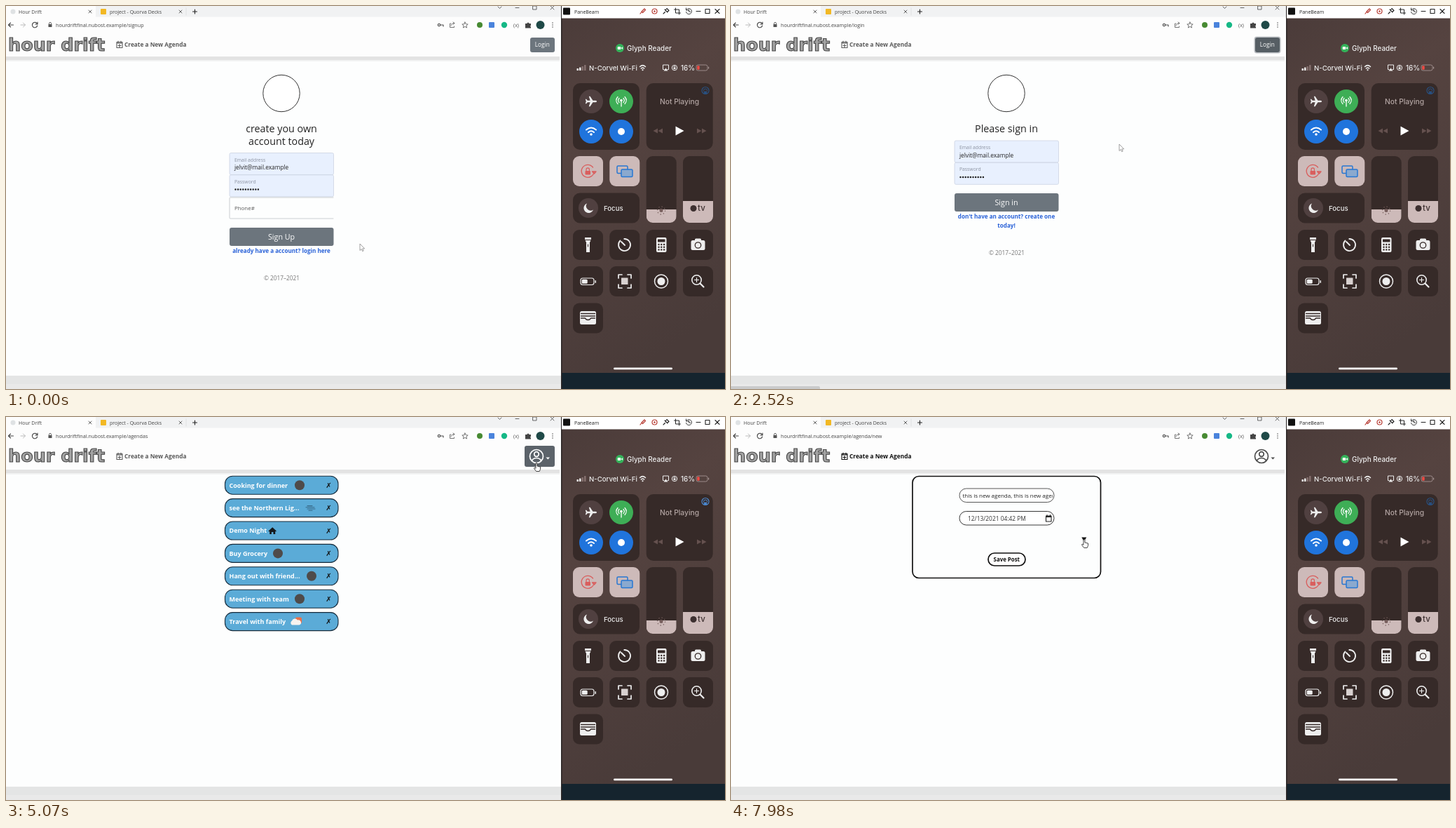
An HTML page that plays this animation: 1026 by 546 pixels, repeating every 8000 ms.

```html
<!DOCTYPE html>
<html lang="en">
<head>
<meta charset="utf-8">
<title>Agenda demo</title>
<style>
html, body { margin: 0; width: 100%; height: 100%; overflow: hidden; background: #fdfefe; }
svg { display: block; width: 1026px; height: 546px; font-family: "Open Sans", "Noto Sans", sans-serif; }
.b { font-weight: 700; }
.m { text-anchor: middle; }
.i { font-family: Inter, Roboto, sans-serif; font-weight: 500; }
.s { font-family: "DejaVu Sans", sans-serif; }
.l { fill: none; stroke-linecap: round; stroke-linejoin: round; }
</style>
</head>
<body>
<svg id="stage" viewBox="0 0 1026 546"></svg>
<script>
const LOOP = 8000, STEP = 132;
const ink = '#222', grey = '#6c757d', link = '#2a62d8', tile = '#362a28', knob = '#504040', pale = '#cdbab9', lit = '#eee';

// Markup helpers: rectangle, circle, text, stroked line, filled path, group
const R = (x, y, w, h, r, fill, more = '') => `<rect x="${x}" y="${y}" width="${w}" height="${h}" rx="${r}" fill="${fill}" ${more}/>`;
const C = (x, y, r, fill, more = '') => `<circle cx="${x}" cy="${y}" r="${r}" fill="${fill}" ${more}/>`;
const T = (x, y, size, text, fill = ink, cls = '', more = '') => `<text x="${x}" y="${y}" font-size="${size}" fill="${fill}" class="${cls}" ${more}>${text}</text>`;
const L = (d, color = ink, w = 1, more = '') => `<path class="l" d="${d}" stroke="${color}" stroke-width="${w}" ${more}/>`;
const F = (d, fill, more = '') => `<path d="${d}" fill="${fill}" ${more}/>`;
const G = (id, ...parts) => `<g id="${id}">${parts.join('')}</g>`;
const line = (color, w) => `stroke="${color}" stroke-width="${w}"`;

function browser() {
  const dim = '#555';
  return [
    R(0, 0, 792, 546, 0, '#fdfefe'), R(0, 0, 792, 72, 0, '#fdfdfd'), R(128, 0, 664, 15.500, 0, '#f1f2f3'),
    C(10, 8, 3.500, '#dfe2e4'), T(18, 10.500, 7, 'Hour Drift', '#444'),
    L('M118 6l4 4m0-4l-4 4M247 6l4 4m0-4l-4 4', dim, .9),
    R(135, 4, 8, 8, 1, '#f2b824'), T(148, 10.500, 7, 'project - Quorva Decks', '#444'),
    L('M257 3v10', '#ddd', .8), L('M266.500 8h6m-3-3v6', ink, 1.100),
    L('M702 1l2.500 2.500l2.500-2.500M727 2.500h5', dim, .9),
    L('M752 0h5v5h-5zM777 0l5 5m0-5l-5 5', dim, .9),
    L('M10.500 27h-7m3-3l-3 3l3 3', '#444', 1.100), L('M21 27h6.500m-3-3l3 3l-3 3', '#bbb', 1),
    L('M44.500 25.500a3.700 3.700 0 1 0 .200 2.500M45 23v3h-3', '#444', 1.100),
    R(60.500, 26, 5, 4, .6, dim), L('M61.500 26v-1.200a1.500 1.500 0 0 1 3 0V26', dim, .9),
    C(618, 27, 1.700, 'none', line(dim, 1.200)), L('M620 27h4v2', dim, 1.200),
    L('M635 25h-1.500v5.500h6V29M635 28q.5-3.500 5-3.500m-2-1.500l2 1.500l-2 1.800', dim, .8),
    L('M655 23l1.200 2.700l3 .3l-2.300 2l.7 3l-2.600-1.600l-2.600 1.600l.7-3l-2.300-2l3-.3z', dim, .8),
    C(676, 27, 4, '#478a32'), R(689, 23, 8, 8, 1, '#4a83dc'), C(711, 27, 4.200, '#16b886'),
    T(728, 29.500, 7, '(x)', dim, 'm'),
    F('M741 25h2.500a1.500 1.500 0 0 1 3 0h2.500v2.500a1.500 1.500 0 0 0 0 2.500v1.500h-8z', '#444'),
    C(762.500, 27, 6, '#1f4947'),
    C(780, 24, .8, dim), C(780, 27, .8, dim), C(780, 30, .8, dim),
    R(0, 527, 792, 19, 0, '#e4e5e5'), R(0, 539, 792, 7, 0, '#e9e9e9'),
    G('band', R(0, 72, 790, 5, 0, '#e3e3e3'), R(0, 77, 790, 2, 0, '#f2f3f3')),
    T(3, 63.500, 25.500, 'hour drift', '#a3a3a3', 's b', line('#444', 1.100)),
    G('nav', L('M158 51.500h8v8h-8zM158 53h8M160 50v2m4-2v2M162 54.500v4m-2-2h4', 'currentColor', 1.100),
      T(169, 58.200, 8.300, 'Create a New Agenda', 'currentColor', 'b')),
    T(71, 29.600, 7.200, '', '#444', '', 'id="url"')
  ].join('');
}

function field(y, label, value) {
  return R(319, y, 148.500, 31, 2, '#e8f0fe', line('#ccd4e2', .8)) + T(326, y + 12, 6.800, label, '#8b92a0') + value;
}

// Sign-up and login share this form; the button sits at a different height.
function form(first, button, caption) {
  return field(first, 'Email address', T(326, first + 23.500, 8.300, 'jelvit@mail.example')) +
    field(first + 31.300, 'Password', L(`M327.500 ${first + 52}h33`, ink, 2.500, 'stroke-dasharray="0 3.600"')) +
    R(319, button, 148.500, 26, 3, grey) + T(393, button + 17.300, 10.700, caption, '#fff', 'm') +
    C(393, 124.500, 26.200, '#fff', line('#333', 1));
}

function loginButton() {
  return G('ring', R(746.500, 43.500, 38, 24, 4, '#b9bdc1')) + R(748, 45, 35, 21, 3, grey, 'id="loginBox"') +
    T(765.300, 58.200, 8.300, 'Login', '#fff', 'm');
}

function signup() {
  return T(393, 179.500, 14.300, 'create you own', ink, 'm') + T(393, 198, 14.300, 'account today', ink, 'm') +
    form(209.500, 316, 'Sign Up') +
    L('M467 273H320q-1 0-1 1v28q0 1 1 1h147', '#c6c9cc', .9) + T(326, 291, 7.900, 'Phone#', '#555') +
    T(393, 352, 8.100, 'already have a account? login here', link, 'b m') +
    T(393.500, 391, 8.300, '© 2017–2021', '#777', 'm');
}

function login() {
  return T(393, 179.500, 14.300, 'Please sign in', ink, 'm') + form(192, 267, 'Sign in') +
    T(393, 303, 8.100, "don't have an account? create one", link, 'b m') +
    T(393, 315.500, 8.100, 'today!', link, 'b m') + T(393.500, 355, 8.300, '© 2017–2021', '#777', 'm');
}

function agendas() {
  const dot = x => y => C(x, y, 7, '#4f4b4a');
  const mist = y => L(`M430 ${y - 3}h7m-9 2.200h12m-10 2.200h11m-9 2.200h5`, '#386987', 1.100);
  const house = y => F(`M374.500 ${y + .5}l5.700-5.200l5.700 5.200l-.9 1l-.8-.7v4.200h-2.700v-3h-2.600v3h-2.700v-4.200l-.8.700z`, '#15191c');
  const cloud = y => R(413, y - 6, 9, 9, 2, '#ea7049') +
    F(`M408 ${y + 5}a3.500 3.500 0 0 1 0-6a4.500 4.500 0 0 1 8-1a3.500 3.500 0 0 1 2.500 7z`, '#f7f3ef');
  return [
    ['Cooking for dinner', dot(419)], ['see the Northern Lig...', mist], ['Demo Night', house],
    ['Buy Grocery', dot(388)], ['Hang out with friend...', dot(436)], ['Meeting with team', dot(419)],
    ['Travel with family', cloud]
  ].map(([text, icon], i) => {
    const y = 97.200 + 32.400 * i;
    return R(312.500, y - 13, 161.500, 26, 11, '#5babd7', line('#172b3b', 1.100)) +
      T(318.500, y + 3.400, 9, text, '#fff', 'b') + icon(y) + T(460.500, y + 3.600, 10, '✗', '#111', 's m');
  }).join('');
}

function newAgenda() {
  const pill = (y, more) => R(326, y, 135, 19.500, 9.700, '#fff', more);
  return R(259, 84.500, 268.500, 145, 9, 'none', line('#111', 1.700)) + pill(102, line('#444', .9)) +
    `<clipPath id="clip">${R(328, 102, 131, 20, 0, '#fff')}</clipPath>` +
    G('title', T(330.500, 115, 8, 'this is new agenda, this is new agenda', ink, '', 'clip-path="url(#clip)"')) +
    pill(134.500, 'id="dateBox" stroke="#222"') +
    G('blank', R(341.500, 139, 15, 12, 0, '#1971d9'), T(342, 147.800, 8, '<tspan fill="#fff">mm</tspan>/dd/yyyy', '#666'),
      T(393, 147.800, 8, '<tspan fill="#bbb">--</tspan>:<tspan fill="#bbb">-- --</tspan>', '#777')) +
    G('date', T(338, 147.800, 8.400, '12/13/2021 04:42 PM', '#333')) +
    L('M449.500 141h7.500v8h-7.500zM451 139.500v1m4.500-1v1', ink, 1.100) + R(449.500, 141, 7.500, 2, 0, ink) +
    F('M500.300 171.500h7l-3.500 6z', '#111') +
    R(367, 194, 53, 18, 9, '#fff', line('#111', 1.700)) + T(393.300, 206, 7.900, 'Save Post', '#111', 'b m') +
    G('popup', R(326.500, 156, 212, 151.500, 1, 'none', line('#ddd', 1.500)),
      R(325.500, 154.500, 212, 151.500, 1, 'none', 'id="sheet" stroke="#c9c9c9" stroke-width=".8"'));
}

function profile() {
  return G('hover', R(740, 41, 43, 30, 3, '#5c636a')) +
    G('user', C(757, 56, 9.500, 'none', line('currentColor', 1.700)),
      C(757, 53, 3.300, 'none', line('currentColor', 1.700)), L('M750.500 62q2-3.500 6.500-3.500t6.500 3.500', 'currentColor', 1.700),
      F('M770.500 57.500h5.500l-2.700 3z', 'currentColor'));
}

function phoneTop() {
  return [
    R(792, 0, 234, 546, 0, 'url(#wall)'), R(792, 523, 234, 23, 0, '#15242e'), R(792, 0, 1.500, 546, 0, '#2a2525'),
    R(793, 0, 233, 17.500, 0, '#fff'), R(795, 2.500, 10, 10, 1, '#111'), T(811, 10.600, 7, 'PaneBeam', '#222'),
    L('M905 11l2-2.500M907 8l4-4l1.500 1.500l-4 4z', '#b5372e', 1.200),
    C(925.500, 7.500, 3.500, 'none', line('#b5372e', 1.200)), C(925.500, 7.500, 1.200, '#b5372e'),
    L('M938 11l2.500-2.500M940 5l4 4M941 6l2-2.500l3 3l-2.500 2', ink, 1.100),
    L('M955.500 3v7h7M953.500 5h7v7', ink, 1),
    L('M971 5.500a4 4 0 1 1-.5 3M970.500 3v3h3M974.500 5.500v2.500h2', '#333', 1),
    L('M985 7.500h6M998 4.500h6v6h-6zM1012 4.500l6 6m0-6l-6 6', ink, 1.100),
    C(876, 60, 6, '#34b35a'), R(872.700, 58, 4.500, 4, 1, '#fff'), F('M877.500 60l2.500-1.800v3.600z', '#fff'),
    T(886, 63.700, 9.900, 'Glyph Reader', lit, 'i'),
    ...[3, 4.500, 6, 8].map((h, i) => R(814.500 + 3.500 * i, 92 - h, 2.500, h, .5, i < 2 ? lit : '#85716f')),
    T(832, 91.700, 9.600, 'N-Corvel Wi-Fi', lit, 'i'),
    L('M904.500 86.500q4-3.800 8 0M906.300 89q2.200-2 4.400 0', lit, 1.500), C(908.500, 91.200, 1.100, lit),
    L('M939 90.500h-1.500v-6.500h8v6.500H944', lit, 1), F('M938.500 92.500l3-4l3 4z', lit),
    C(954, 88, 3.700, 'none', line(lit, 1)), R(952.500, 87.500, 3, 2.500, .4, lit), L('M953 87v-1h2v1', lit, .8),
    T(963, 91.700, 9.900, '16%', lit, 'i'),
    R(985, 84, 16, 8, 2.500, 'none', line('#a39291', .9)), R(986.200, 85.200, 3.500, 5.600, 1, '#ee4b44'), R(1002, 86.500, 1.200, 3, .5, '#a39291')
  ].join('');
}

function phoneTiles() {
  const small = (x, y, fill = tile) => R(x, y, 43, 43, 9, fill);
  const xs = [809, 861.300, 913.700, 966];
  const wave = (x, y, r) => L(`M${x - r} ${y - r}q${-r * .9} ${r} 0 ${2 * r}M${x + r} ${y - r}q${r * .9} ${r} 0 ${2 * r}`, '#fff', 1.200);
  return [
    R(809, 110, 95, 95, 10, tile), R(913.700, 110, 95, 95, 10, tile),
    C(835, 136, 17, knob), C(878, 136, 17, '#3eae56'), C(835, 179, 17, '#2074dc'), C(878, 179, 17, '#2074dc'),
    F('M843 136q0-1.300-2-1.300h-3.500l-4-6h-1.700l1.800 6h-3.800l-1.700-2h-1.300l1 3.300l-1 3.300h1.300l1.700-2h3.800l-1.800 6h1.700l4-6h3.500q2 0 2-1.300z', lit),
    C(878, 134.500, 1.800, '#fff'), L('M878 136v7', '#fff', 1.300), wave(878, 134.500, 3), wave(878, 134.500, 5),
    L('M828 176.500q7-6 14 0M831 180q4-3.500 8 0', '#fff', 2), C(835, 183, 1.800, '#fff'), C(878, 179, 5, '#fff'),
    T(961, 139.500, 10.300, 'Not Playing', '#b3a5a3', 'i m'),
    F('M955.500 171.500l12 6.500l-12 6.500z', '#fff'),
    F('M930 174.500v7l-6.500-3.500zM937 174.500v7l-6.500-3.500zM986 174.500v7l6.500-3.500zM993 174.500v7l6.500-3.500z', '#65514f'),
    G('cast', C(998, 120.500, 5, 'none', line('currentColor', 1.200)), C(998, 120.500, 2.500, 'none', line('currentColor', 1)), F('M994.500 125l3.500-4l3.500 4z', 'currentColor')),
    small(xs[0], 214, pale), small(xs[1], 214, pale),
    L('M837.500 230a9 9 0 1 0 1.700 6M836.500 236h5.500l-2.500 3z', '#d95e5d', 1.300),
    R(826.500, 235, 7.500, 5.500, 1, '#d95e5d'), L('M828 235v-2a2.200 2.200 0 0 1 4.400 0v2', '#d95e5d', 1.200),
    R(872, 228, 15, 10.500, 1.500, 'none', line('#2777d2', 1.500)), R(878, 233, 16, 10.500, 1.500, '#8ba9ce', line('#2777d2', 1.500)),
    `<clipPath id="sliders">${R(xs[2], 214, 43, 95, 9, '#fff')}${R(xs[3], 214, 43, 95, 9, '#fff')}</clipPath>`,
    R(xs[2], 214, 43, 95, 9, tile), R(xs[3], 214, 43, 95, 9, tile),
    `<g clip-path="url(#sliders)">${R(xs[2], 290, 43, 20, 0, pale)}${R(xs[3], 278, 43, 32, 0, pale)}</g>`,
    C(935, 291.500, 2.500, '#78605e'), C(935, 291.500, 5.500, 'none', line('#78605e', 1.300) + ' stroke-dasharray="1.300 3"'),
    C(981, 288.500, 4.500, '#3d3030'), T(987, 292.300, 11.500, 'tv', '#3d3030', 'i'),
    R(809, 266.500, 95, 43, 10, tile), C(831, 288, 14, knob),
    F('M829 281.500a7 7 0 1 0 9 9a6.500 6.500 0 0 1-9-9z', lit), T(853, 291.700, 9.600, 'Focus', lit, 'i'),
    ...[319, 371].flatMap(y => xs.map(x => small(x, y))), small(xs[0], 423.500),
    F('M826 330h9v3l-2 4v14h-5v-14l-2-4z', lit), L('M826 333.500h9M830.500 340v3', tile, 1),
    L('M882.500 332a8.500 8.500 0 1 1-6 2.500', lit, 1.800), L('M878 336l5 5', lit, 1.800), C(882.500, 332, 1, lit),
    R(928, 330, 14.500, 21, 2, lit), R(930, 332.500, 10.500, 4, .5, tile),
    ...Array.from({ length: 9 }, (_, i) => C(931.500 + i % 3 * 3.800, 340 + (i / 3 | 0) * 3.700, 1.200, tile)),
    R(977.500, 334, 20, 14, 2.500, lit), R(983, 331.500, 9, 4, 1.500, lit), C(987.500, 341, 4.200, lit, line(tile, 1.300)),
    R(820, 388, 19, 9.500, 3, 'none', line(lit, 1.200)), R(821.700, 389.700, 8, 6, 1.500, lit), R(840.500, 391, 1.500, 4, .7, lit),
    L('M874 388v-5h5M887 383h5v5M892 397v5h-5M879 402h-5v-5', lit, 1.700), R(878, 387.500, 9.500, 9.500, .5, '#d8d1d0'),
    C(935, 392.500, 9.500, 'none', line(lit, 1.500)), C(935, 392.500, 5.500, lit),
    C(985.500, 390.500, 6.700, 'none', line(lit, 1.600)), L('M990.500 395.500l5 5', lit, 2.200), L('M982.500 390.500h6m-3-3v6', lit, 1.200),
    R(819, 435, 23, 19, 2.500, lit), L('M820.500 438.500h20M820.500 442h20M820.500 445h6q1 2.500 4 2.500t4-2.500h6', tile, 1.300),
    R(867, 515.500, 84, 2.800, 1.400, '#fff')
  ].join('');
}

const pointers = [
  G('arrow', F('M0 0v9.500l2.200-2l1.500 3.200l1.500-.7l-1.500-3.100h3z', '#fff', line('#888', .8))),
  G('ibeam', L('M-2-4.500q2 0 2 1v7q0 1-2 1M2-4.500q-2 0-2 1v7q0 1 2 1', '#333', .9)),
  G('hand', F('M-1 0q1-1 2 0v4l4.500 1v3.500l-1.300 3h-4.500l-3.200-4.200q0-1.500 1.500-.8l1 .8z', '#fff', line('#333', .9)))
].join('');

const stage = document.getElementById('stage');
stage.innerHTML = `<defs><linearGradient id="wall" x1="0" y1="0" x2=".3" y2="1">
  <stop offset="0" stop-color="#4a3b39"/><stop offset=".35" stop-color="#554340"/><stop offset="1" stop-color="#493b39"/></linearGradient></defs>` +
  browser() + G('loginNav', loginButton()) + G('userNav', profile()) +
  G('page0', signup()) + G('page1', login()) + G('page2', agendas()) + G('page3', newAgenda()) +
  G('status', R(-3, 542, 130, 8, 2, '#c9cacb')) + phoneTop() + phoneTiles() + G('cursor', pointers);

const el = Object.fromEntries([...stage.querySelectorAll('[id]')].map(n => [n.id, n]));
const show = (id, on) => { el[id].style.display = on ? '' : 'none'; };
const within = (t, a, b) => t >= a && t < b;

// Cursor stops: arrive, leave, x, y, shape
const stops = [
  [0, 480, 505, 339, 'arrow'], [1560, 1850, 379, 302, 'ibeam'], [2200, 2320, 765, 56, 'hand'],
  [2500, 2600, 554, 197, 'arrow'], [2880, 3150, 393, 281, 'hand'], [3660, 3820, 734, 25, 'arrow'],
  [4200, 5220, 757, 66, 'hand'], [5700, 6000, 210, 56, 'hand'], [6250, 6500, 393, 112, 'ibeam'],
  [6850, 7000, 460, 143, 'arrow'], [7280, 7560, 430, 232, 'arrow'], [7850, LOOP, 504, 175, 'hand']
];

function moveCursor(t) {
  const i = stops.findLastIndex(s => s[0] <= t), from = stops[i], to = stops[i + 1] || from;
  const k = t <= from[1] ? 0 : (t - from[1]) / (to[0] - from[1]);
  const e = k * k * (3 - 2 * k);
  const x = from[2] + (to[2] - from[2]) * e, y = from[3] + (to[3] - from[3]) * e;
  const near = [from, to].find(s => Math.hypot(s[2] - x, s[3] - y) < 12);
  const shape = near ? near[4] : 'arrow';
  el.cursor.setAttribute('transform', `translate(${x} ${y})`);
  for (const id of ['arrow', 'ibeam', 'hand']) show(id, id === shape);
}

function draw(time) {
  const t = Math.floor(time % LOOP / STEP) * STEP;
  const page = [2300, 3230, 5900].filter(start => t >= start).length;
  for (let i = 0; i < 4; i++) show('page' + i, i === page);
  show('loginNav', page < 2);
  show('userNav', page > 1);
  show('ring', page === 1);
  el.loginBox.setAttribute('fill', page === 1 ? '#565e64' : grey);
  el.band.setAttribute('transform', `translate(0 ${page > 1 ? 3 : 0})`);
  el.nav.setAttribute('transform', `translate(0 ${page > 1 ? 1 : 0})`);
  el.nav.style.color = t >= 5650 ? '#111' : '#5a5a5a';
  el.url.textContent = 'hourdriftfinal.nubost.example/' + ['signup', 'login', 'agendas', 'agenda/new'][page];
  const over = within(t, 4120, 5330);
  show('hover', over);
  el.user.style.color = over ? '#fff' : '#4d4d4d';
  show('status', within(t, 2200, 2900) || within(t, 5700, 6050));

  const picked = t >= 7280;
  show('title', t >= 6480);
  show('blank', !picked);
  show('date', picked);
  show('popup', within(t, 6850, 7720));
  el.sheet.setAttribute('fill', t >= 6980 ? '#fff' : 'none');
  el.dateBox.setAttribute('stroke-width', within(t, 6700, 7720) ? 1.5 : .9);
  el.cast.style.color = (time % LOOP - 1650 + 2240) % 1120 < 400 ? '#4a86cc' : '#29507f';
  moveCursor(t);
}

const start = performance.now();
function tick() {
  draw(performance.now() - start);
  requestAnimationFrame(tick);
}
tick();
</script>
</body>
</html>
```
